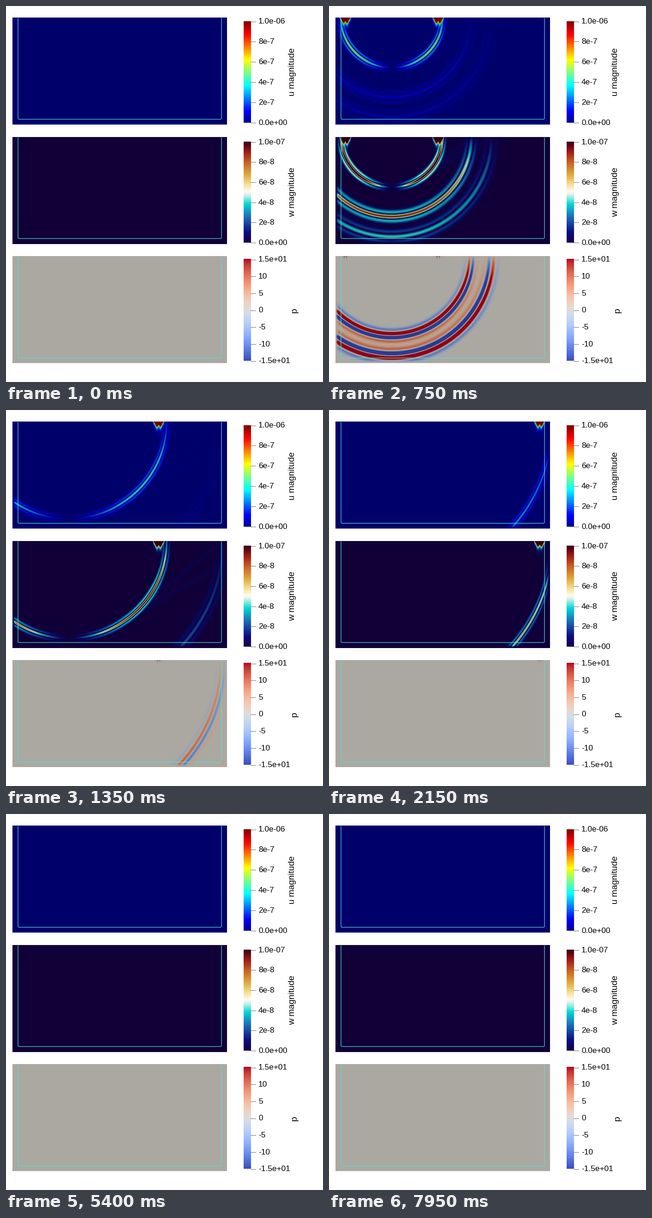
Write a matplotlib script that moves like this. It is 687 px wide and 815 px high and loops after 8 s.

```python
import numpy as np
import matplotlib.pyplot as plt
from matplotlib.animation import FuncAnimation
from matplotlib.colors import LinearSegmentedColormap
from matplotlib.path import Path
from matplotlib.patches import PathPatch

W, H, DPI = 687, 815, 64
FRAMES, STEP = 160, 50
LEFT, PW, PH = 14, 465, 232
TOPS = (25, 284, 542)
ONSET, HUB = 109, 136
V_FAST, V_SLOW, V_SHEAR, V_SURF = 0.337, 0.269, 0.17, 0.157


def px(v):
    return v * 72 / DPI


def ramp(name, stops):
    return LinearSegmentedColormap.from_list(name, stops, N=512)


JET = ramp("jet2", [
    (0, (0, 0, .5625)), (.111, (0, 0, 1)), (.365, (0, 1, 1)),
    (.5, (.5, 1, .5)), (.62, (1, 1, 0)), (.873, (1, 0, 0)), (1, (.5, 0, 0))])
ICE = ramp("ice", [
    (0, "#16004a"), (.1, "#0a0c82"), (.25, "#1c6cb8"), (.38, "#00d6d8"),
    (.44, "#86eedb"), (.485, "#eef4f2"), (.51, "#fffaf0"), (.58, "#f6df90"),
    (.68, "#dfa63a"), (.8, "#c85e22"), (.9, "#a01c16"), (.97, "#5a0418"),
    (1, "#38041a")])
WARM = plt.get_cmap("coolwarm", 512)


def table(cmap, light):
    rgb = cmap(np.linspace(0, 1, 512))[:, :3] * light
    return (rgb * 255).astype(np.uint8)


LUTS = (table(JET, (.75, .75, .74)), table(ICE, (.76, .78, .75)),
        table(WARM, (.78, .765, .73)))

# Panel coordinates measured from the impact point on the top edge
gx, gz = np.meshgrid(np.arange(PW, dtype=np.float32) + LEFT + .5 - HUB,
                     np.arange(PH, dtype=np.float32) + .5)
span = np.abs(gx)
rad = np.hypot(gx, gz)
cos_t, sin_t = gz / rad, span / rad
theta = np.arctan2(span, gz)
edge = np.minimum(np.minimum(gx + HUB - LEFT, LEFT + PW - HUB - gx), PH - gz)
taper = 1 - np.exp(-(edge / 4.5) ** 2)
p_dir = np.sqrt(cos_t)
s_dir = .9 * np.abs(np.sin(2 * theta)) ** 1.1 + .28 * sin_t ** 2
phase = .6 * np.clip((theta - .6) / .6, 0, 1)


def ricker(x):
    return (1 - x * x) * np.exp(-x * x / 2)


def slope(x):
    return x * (3 - x * x) * np.exp(-x * x / 2)


def bump(x, s):
    return np.exp(-.5 * (x / s) ** 2)


def head_wave(age, v):
    s = V_SHEAR / v
    c = np.sqrt(1 - s * s)
    front = ricker((span * s + gz * c - V_SHEAR * age) / 3.5)
    inside = np.clip((span * c - gz * s) / 12, 0, 1)
    inside = inside * np.clip((v * age - span) / 10, 0, 1)
    return np.abs(front) * inside


def surface_wave(age):
    """Displacement blobs, their glow and the pressure under them."""
    reach = V_SURF * max(age, 0)
    gain = np.exp(-max(age, 0) / 3500) * np.exp(-(min(age, 0) / 28) ** 2)
    blob, glow, press = 0, 0, 0
    for side in (-1, 1):
        d = side * gx - reach
        fingers = bump(d - 3.7, 2.1) + bump(d + 3.7, 2.1)
        wings = bump(np.abs(d) - 9, 1.8)
        blob = blob + 10 * np.exp(-gz / 5) * fingers
        blob = blob + 1.6 * np.exp(-gz / 4.5) * wings
        glow = glow + .35 * np.exp(-gz / 13) * bump(d, 6)
        press = press + 13 * np.exp(-gz / 4) * slope(d / 3.2)
    return gain * blob, gain * glow, gain * press


def fields(t):
    age = t - ONSET
    fade_p = np.exp(-(t - 750) / 545)
    fade_s = np.exp(-(t - 750) / 2000)
    xs = (rad - V_SLOW * age) / 5.4
    xf = (rad - V_FAST * age) / 6.2
    slow = np.abs(ricker(xs)) * p_dir * fade_p
    fast = np.abs(ricker(xf)) * p_dir * fade_p
    x = (rad - V_SHEAR * age) / 3.5
    wave = np.cos(phase) * ricker(x) + .72 * np.sin(phase) * slope(x)
    shear = 1.2 * s_dir * fade_s * np.abs(wave)
    head = 0
    if age > 0:
        head = (head_wave(age, V_SLOW) + head_wave(age, V_FAST)) * fade_s
    blob, glow, press = surface_wave(age)

    u = np.sqrt((.09 * slow) ** 2 + (.06 * fast) ** 2 + (.48 * shear) ** 2
                + (.015 * head) ** 2 + (blob + .3 * glow) ** 2)
    w = np.sqrt((.9 * slow) ** 2 + (.43 * fast) ** 2 + shear ** 2
                + (.06 * head) ** 2 + (1.4 * blob + glow) ** 2)
    p = p_dir * fade_p * 25 * (slope(xf) - slope(xs)) + press
    return u * taper, w * taper, .5 + p * taper / 30


def shade(field, lut):
    return lut[(np.clip(field, 0, 1) * 511).astype(np.int16)]


fig = plt.figure(figsize=(W / DPI, H / DPI), dpi=DPI, facecolor="white")
ax = fig.add_axes([0, 0, 1, 1])
ax.axis("off")


def picture(data, x0, x1, y0, y1):
    return ax.imshow(data, extent=(x0, x1, y1, y0), aspect="auto",
                     interpolation="nearest")


def label(x, y, s, size, **kw):
    ax.text(x, y, s, fontsize=px(size), family="Liberation Sans",
            color="black", **kw)


def inner_frame(y0, y1):
    x0, x1, r = 26, 467, 2.5
    pts = [(x0, y0), (x0, y1 - r), (x0, y1), (x0 + r, y1),
           (x1 - r, y1), (x1, y1), (x1, y1 - r), (x1, y0)]
    codes = [Path.MOVETO, Path.LINETO, Path.CURVE3, Path.CURVE3,
             Path.LINETO, Path.CURVE3, Path.CURVE3, Path.LINETO]
    ax.add_patch(PathPatch(Path(pts, codes), fill=False, ec="#52dede",
                           lw=px(1.2), zorder=3))


def color_bar(cmap, y0, y1, ticks):
    grad = np.linspace(1, 0, 256)
    picture(cmap(grad)[:, None, :], 515, 531, y0, y1)
    for y, s in zip(np.linspace(y0 + .5, y1, len(ticks)), ticks):
        ax.plot([530, 541], [y, y], color="#707070", lw=px(1), zorder=3)
        label(547, y + 5, s, 17.3, va="baseline")


def title(x, y, s):
    label(x, y, s, 19, rotation=90, rotation_mode="anchor",
          ha="center", va="baseline")


REST = fields(0)
panels = []
for top, lut, field in zip(TOPS, LUTS, REST):
    panels.append(picture(shade(field, lut), LEFT, LEFT + PW, top, top + PH))
for top, bottom in zip(TOPS, (245.5, 504, 763)):
    inner_frame(top + 1, bottom)

color_bar(JET, 33, 253, ["1.0e-06", "8e-7", "6e-7", "4e-7", "2e-7", "0.0e+00"])
color_bar(ICE, 294, 513, ["1.0e-07", "8e-8", "6e-8", "4e-8", "2e-8", "0.0e+00"])
color_bar(WARM, 549, 769.5,
          ["1.5e+01", "10", "5", "0", "-5", "-10", "-1.5e+01"])
title(625, 143, "u magnitude")
title(625, 403.5, "w magnitude")
title(630, 659.5, "p")
ax.set_xlim(0, W)
ax.set_ylim(H, 0)


def update(i):
    t = i * STEP
    data = fields(t) if 0 < t < 2700 else REST
    for im, field, lut in zip(panels, data, LUTS):
        im.set_data(shade(field, lut))
    return panels


anim = FuncAnimation(fig, update, frames=FRAMES, interval=STEP, repeat=True,
                     repeat_delay=0, blit=False)
plt.show()
```
